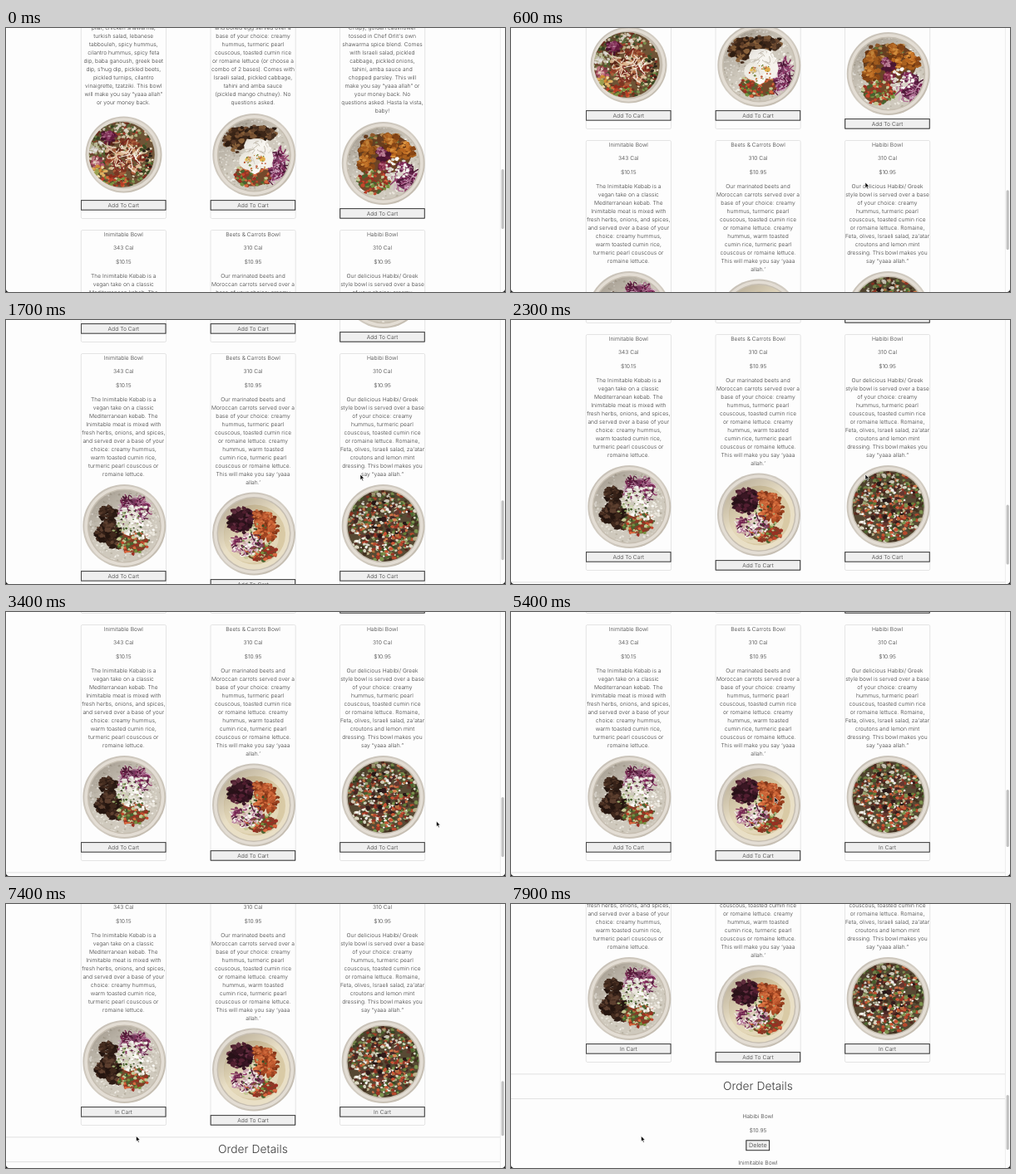
An HTML page that plays this animation: 600 by 318 pixels, repeating every 8000 ms.

```html
<!DOCTYPE html>
<html lang="en">
<head>
<meta charset="utf-8">
<title>Bowl menu</title>
<style>
html, body { margin: 0; width: 100%; height: 100%; overflow: hidden; background: #fdfdfd; }
svg { display: block; width: 600px; height: 318px; }
text {
  font: 300 6.7px Inter, "Open Sans", sans-serif;
  letter-spacing: .03px; fill: #3c3c3c; text-anchor: middle;
  text-rendering: geometricPrecision;
}
#heading { font-size: 13.8px; }
.small { font-size: 7.2px; }
.card { fill: none; stroke: #dfdfdf; stroke-width: .8; }
.rule { stroke: #dedede; stroke-width: .9; }
</style>
</head>
<body>
<svg id="stage" viewBox="0 0 600 318"></svg>
<script>
const LOOP = 8000, STEP = 100;
const COLS = [141.3, 297, 452.5];

let seed = 7;
function rnd() {
  seed = (seed + 0x6D2B79F5) | 0;
  let t = Math.imul(seed ^ (seed >>> 15), 1 | seed);
  t = (t + Math.imul(t ^ (t >>> 7), 61 | t)) ^ t;
  return ((t ^ (t >>> 14)) >>> 0) / 4294967296;
}
const spread = a => (rnd() * 2 - 1) * a;
const pick = list => list[Math.floor(rnd() * list.length)];
const num = v => v.toFixed(1);

// Food shapes, in a space where the bowl has radius 50
function spot(x, y, rx, ry) {
  const a = rnd() * Math.PI * 2, d = Math.sqrt(rnd());
  return [x + Math.cos(a) * d * rx, y + Math.sin(a) * d * ry];
}
function chunk(x, y, size, color) {
  const turn = rnd() * 6, pts = [];
  for (let i = 0; i < 6; i++) {
    const a = turn + i * Math.PI / 3, d = size * (.6 + rnd() * .5);
    pts.push(num(x + Math.cos(a) * d) + "," + num(y + Math.sin(a) * d * .8));
  }
  return `<polygon points="${pts.join(" ")}" fill="${color}"/>`;
}
function bits(n, x, y, rx, ry, size, colors) {
  const list = colors.split(" ");
  let out = "";
  while (n--) out += chunk(...spot(x, y, rx, ry), size * (.7 + rnd() * .6), pick(list));
  return out;
}
function shreds(n, x, y, rx, ry, len, width, colors) {
  const list = colors.split(" ");
  let out = "";
  while (n--) {
    const [px, py] = spot(x, y, rx, ry);
    out += `<path d="M${num(px)} ${num(py)}q${num(spread(len))} ${num(spread(len))} ${num(spread(len))} ${num(spread(len))}" fill="none" stroke="${pick(list)}" stroke-width="${width}" stroke-linecap="round"/>`;
  }
  return out;
}
const disc = (x, y, rx, ry, color) =>
  `<ellipse cx="${x}" cy="${y}" rx="${rx}" ry="${ry}" fill="${color}"/>`;
// A rough lump: dark all round, lit from the upper left
const ball = (x, y, r, dark, light) =>
  bits(30, x + 1, y + 1.5, r * .85, r * .85, r * .35, dark) +
  bits(26, x - r * .1, y - r * .15, r * .65, r * .6, r * .22, light);

const RICE = "#e9e5dc #d8d3c8 #c6c0b3 #f3f0e9 #b5ae9f";
const GREEN = "#4c6630 #7d9450 #354a24 #a5b27a";
const SALAD = "#c4472c #d8683f #74913f #c3c893 #48632f #9c2f22 #8a3a26";
const PURPLE = "#5e1c42 #8f3566 #b27396 #7a2353 #d3b0c4 #4a1734";
const WHITE = "#fbfaf6 #ece8df #dad5c9";
const HOT = "#c9772a #dc9440 #b8651f", BURNT = "#8a4716 #a9601f #6f3812";
const DARK = "#2c1b14 #3f281c #24150f", CRUST = "#4a3023 #5e4030 #38231a";

const rice = () => disc(0, 0, 45, 45, "#cfc9bd") + bits(420, 0, 0, 44, 44, 1.5, RICE);
const salad = (x, y, rx, ry) => disc(x, y, rx * .9, ry * .9, "#73492b") + bits(100, x, y, rx, ry, 2.6, SALAD);
const cabbage = (x, y, rx, ry) => disc(x, y, rx * .85, ry * .85, "#7a3a62") + shreds(110, x, y, rx, ry, 8, 1.3, PURPLE);

const FOODS = {
  chicken: () => disc(0, 0, 46, 46, "#6e5436") +
    bits(280, 0, 0, 45, 45, 2.6, GREEN + " #75311f #e6dcc6 #a8452e #573a24 #d9c9a2") +
    bits(50, 3, -30, 20, 10, 2.6, "#f1ebdd #a93a2a #ded0b3 #5c7340 #c9b48a") +
    ball(-18, -24, 10, "#6b1b43 #8a2c5c #4e1230", "#a24a78 #c98aaa #8c2f60") +
    bits(34, -33, -8, 10, 9, 2.8, WHITE + " #cfd1a9 #b9b98c") +
    ball(-33, 9, 9, "#9c4257 #b86678 #7d3543", "#e0b2b0 #c97d87 #eadcc6") +
    bits(34, -30, 22, 9, 8, 2.8, "#d08a35 #e0b160 #9aa050 #e8d9a8") +
    bits(44, -8, 34, 18, 8, 2.8, "#b93d26 #d8693c #7d9440 #8f2c1c") +
    bits(110, 4, 3, 25, 24, 3.8, "#7c3522 #a85d3b #c99468 #5c2618 #913f29 #dcb48c") +
    bits(50, 31, 10, 10, 22, 2.6, "#3c4a24 #812c20 #d8c9a6 #2b2018") +
    shreds(44, 3, 0, 22, 21, 12, 1.3, "#f8efe2 #ecd9c4 #7d2420 #e0c3a6"),
  egg: () => rice() +
    disc(-16, -20, 17, 14, "#3d2618") + disc(6, -27, 16, 8, "#3d2618") +
    bits(70, -18, -19, 19, 16, 3.8, "#452b1a #62402a #805635 #2f1d12 #94693f") +
    bits(40, 8, -27, 19, 9, 3.4, "#452f20 #6b4930 #2c1d13 #805a38") +
    cabbage(27, 13, 13, 20) + salad(-2, 25, 24, 14) +
    bits(44, 3, 0, 18, 19, 5.5, WHITE) +
    disc(3, -10, 15, 10, "#f8f6f1") + disc(-6, 7, 12, 11, "#efece4") + disc(14, 3, 9, 13, "#f5f2ec") +
    disc(-7, 6, 4, 3, "#e6bb56") + disc(10, 5, 3.5, 3, "#e0ac48") +
    shreds(14, 4, 0, 17, 17, 9, 1, "#d6d0c4 #c6bfb2") +
    bits(30, 4, 10, 17, 11, 1.3, "#c98434 #73853f #b95230"),
  cauliflower: () => rice() +
    disc(2, -12, 32, 24, "#6b4426") +
    bits(50, 2, -26, 28, 11, 2.8, "#a5642f #c99a5c #71401f #6c7c3c") +
    [[-20, -20], [8, -28], [-22, -1], [28, -17], [10, -10]]
      .map(([x, y]) => ball(x, y, 11, BURNT, HOT)).join("") +
    ball(-2, -12, 9, "#5c1a38 #78284c #4a1530", "#9c4a70 #bd8098 #7d2c52") +
    ball(1, 4, 8, "#7a2440 #963a52 #5c1a30", "#b8607a #8f3450") +
    salad(-12, 23, 20, 14) + cabbage(27, 17, 13, 17) +
    bits(46, 17, 6, 14, 12, 2.4, WHITE),
  kebab: () => rice() +
    cabbage(12, -20, 21, 15) +
    bits(40, 20, -12, 16, 12, 2.4, RICE) +
    [[-20, -16], [-25, 8], [-11, 16], [-16, 2]]
      .map(([x, y]) => ball(x, y, 12, DARK, CRUST)).join("") +
    salad(11, 19, 19, 15) +
    bits(70, 4, -7, 13, 18, 2.8, WHITE + " #cdd3b0") +
    bits(44, 22, 4, 15, 13, 2.2, WHITE) +
    bits(36, 6, 2, 20, 24, 1.5, GREEN),
  beets: () => disc(0, 0, 45, 45, "#e9dfc6") + disc(1, 1, 37, 36, "#d9caa5") + disc(-3, 3, 33, 32, "#e3d7b8") +
    disc(-15, -16, 14, 13, "#321220") +
    bits(60, -15, -16, 16, 15, 4.2, "#3c1626 #551f33 #281019 #693046") +
    [[5, -23], [17, -20], [21, -9], [8, -11], [18, 1], [6, 0]]
      .map(([x, y]) => ball(x, y, 8.5, "#9c4320 #b5522a #833518", "#d0683a #c25a30 #dc7c48")).join("") +
    disc(-8, 14, 20, 11, "#c9a9a4") + salad(8, 22, 21, 11) +
    bits(90, -9, 13, 20, 12, 2.6, "#f8f4ee #e8dcd6 #c99fae #7d3a58 #ddd0bb") +
    shreds(34, -10, 14, 17, 11, 8, 1.2, PURPLE + " #f4efe9") +
    bits(26, 3, 6, 18, 18, 1.8, GREEN + " #f4efe9"),
  habibi: () => disc(0, 0, 46, 46, "#574a34") +
    bits(380, 0, 0, 43, 43, 2.9, GREEN + " #b5492e #9a3524 #dcd8c4 #53291f #cc7048 #b9ae88 #41301f") +
    bits(46, 0, -4, 34, 30, 3.8, "#321c1b #4a2825 #251716 #63382f") +
    bits(110, 0, 0, 39, 39, 2, WHITE + " #d3d6bf") +
    bits(46, 0, 4, 36, 32, 2.4, "#cc5434 #657f3a #b0703f #d8824c")
};

function bowl([x, y, r, food]) {
  const inner = food === "chicken" ? -2.5 : 0;
  return `<g transform="translate(${x} ${y}) scale(${r / 50})">` +
    `<circle r="50" fill="url(#rim)"/><circle r="48" fill="#e3ddd4"/><circle r="44.5" fill="#c6beb1"/>` +
    `<g clip-path="url(#inside)" transform="translate(${inner} 0)"><g filter="url(#soft)">${FOODS[food]()}</g>` +
    `<circle r="46" fill="url(#shade)"/></g></g>`;
}

function label(x, y, str, attrs = "") {
  return `<text x="${x}" y="${y + 2.4}" ${attrs}>${str}</text>`;
}
const lines = (x, y, str) =>
  str.split("|").map((s, i) => label(x, y + i * 10, s)).join("");

function button(x, y, w, h, str, attrs) {
  const l = x - w / 2, t = y - h / 2;
  return `<rect x="${l}" y="${t}" width="${w}" height="${h}" fill="#1a1a1a"/>` +
    `<path d="M${l} ${t + h}V${t}H${l + w}l-.9 .9H${l + .9}V${t + h - .9}z" fill="#4c4c4c"/>` +
    `<rect x="${l + .9}" y="${t + .9}" width="${w - 1.8}" height="${h - 1.8}" fill="#efefef"/>` +
    label(x, y, str, attrs);
}
const card = (x, top, bottom) =>
  `<rect class="card" x="${x - 51}" y="${top}" width="102.2" height="${bottom - top}" rx="1.6"/>`;

// Page positions are those seen with the scroll offset at zero
const UPPER = [
  { text: "pilaf, chicken shawarma,|turkish salad, lebanese|tabbouleh, spicy hummus,|cilantro hummus, spicy feta|dip, baba ganoush, greek beet|dip, s’hug dip, pickled beets,|pickled turnips, cilantro|vinaigrette, tzatziki. This bowl|will make you say “yaaa allah”|or your money back.",
    bowl: [141.5, -75.5, 46, "chicken"], button: -14.6 },
  { text: "and boiled egg served over a|base of your choice: creamy|hummus, turmeric pearl|couscous, toasted cumin rice|or romaine lettuce (or choose a|combo of 2 bases). Comes with|Israeli salad, pickled cabbage,|tahini and amba sauce|(pickled mango chutney). No|questions asked.",
    bowl: [298.3, -75, 50, "egg"], button: -14.6 },
  { text: "Crispy, golden cauliflower|tossed in Chef Orlit's own|shawarma spice blend. Comes|with Israeli salad, pickled|cabbage, pickled onions,|tahini, amba sauce and|chopped parsley. This will|make you say “yaaa allah” or|your money back. No|questions asked. Hasta la vista,|baby!",
    bowl: [453.7, -65, 50, "cauliflower"], button: -4.6 }
];
const LOWER = [
  { name: "Inimitable Bowl", cal: 343, price: "$10.15", id: "kebabButton",
    text: "The Inimitable Kebab is a|vegan take on a classic|Mediterranean kebab. The|Inimitable meat is mixed with|fresh herbs, onions, and spices,|and served over a base of your|choice: creamy hummus,|warm toasted cumin rice,|turmeric pearl couscous or|romaine lettuce.",
    bowl: [142.3, 223, 50, "kebab"], button: 283.4 },
  { name: "Beets &amp; Carrots Bowl", cal: 310, price: "$10.95", id: "beetsButton",
    text: "Our marinated beets and|Moroccan carrots served over a|base of your choice: creamy|hummus, turmeric pearl|couscous, toasted cumin rice|or romaine lettuce. creamy|hummus, warm toasted|cumin rice, turmeric pearl|couscous or romaine lettuce.|This will make you say ‘yaaa|allah.’",
    bowl: [298, 232.5, 50, "beets"], button: 293.4 },
  { name: "Habibi Bowl", cal: 310, price: "$10.95", id: "habibiButton",
    text: "Our delicious Habibi/ Greek|style bowl is served over a base|of your choice: creamy|hummus, turmeric pearl|couscous, toasted cumin rice|or romaine lettuce. Romaine,|Feta, olives, Israeli salad, za'atar|croutons and lemon mint|dressing. This bowl makes you|say “yaaa allah.”",
    bowl: [453.6, 223, 50, "habibi"], button: 283.4 }
];

const upper = UPPER.map((d, i) => card(COLS[i], -420, 1.5) + lines(COLS[i], -228, d.text) +
  bowl(d.bowl) + button(COLS[i], d.button, 102.4, 12.4, "Add To Cart")).join("");
const lower = LOWER.map((d, i) => card(COLS[i], 15.5, 299.5) +
  label(COLS[i], 20.3, d.name) + label(COLS[i], 37, d.cal + " Cal") +
  label(COLS[i], 53.6, d.price) + lines(COLS[i], 70.2, d.text) + bowl(d.bowl) +
  button(COLS[i], d.button, 102.4, 12.4, "Add To Cart", `id="${d.id}"`)).join("");
const order = (id, y, name, price) => `<g id="${id}">` + label(297, y, name) +
  label(297, y + 16.5, price) + button(296.8, y + 34.8, 28.6, 12.8, "Delete", 'class="small"') + "</g>";

const $ = id => document.getElementById(id);
$("stage").innerHTML = `
<defs>
  <linearGradient id="rim" x1="0" y1="0" x2="1" y2="1">
    <stop offset="0" stop-color="#c4bdb3"/><stop offset=".5" stop-color="#d3cdc3"/><stop offset="1" stop-color="#beb6a9"/>
  </linearGradient>
  <linearGradient id="shade" x1=".1" y1="0" x2=".7" y2=".8">
    <stop offset="0" stop-color="#2a1c10" stop-opacity=".3"/><stop offset=".6" stop-color="#2a1c10" stop-opacity="0"/>
  </linearGradient>
  <filter id="soft"><feGaussianBlur stdDeviation=".5"/></filter>
  <clipPath id="inside"><circle r="43"/></clipPath>
</defs>
<rect width="600" height="318" fill="#fdfdfd"/>
<g id="page">${upper}${lower}
  <path class="rule" d="M0 313.9H594M0 343.6H594"/>
  <text id="heading" x="297" y="333.2">Order Details</text>
  ${order("orderOne", 365, "Habibi Bowl", "$10.95")}
  ${order("orderTwo", 421, "Inimitable Bowl", "$10.15")}
</g>
<path d="M594.4 0V318" stroke="#e9e9e9" stroke-width=".7"/>
<rect id="thumb" x="595.6" width="3.2" rx="1.6" fill="#c1c1c1"/>
<path d="M0 318V315Q.3 317.7 3 318zM600 318V315Q599.7 317.7 597 318z" fill="#111"/>
<path id="arrow" d="M0 0V6.6L1.5 5.2L2.6 7.7L3.7 7.2L2.6 4.8H4.7z" fill="#000" stroke="#fff" stroke-width=".6"/>
<path id="hand" d="M1.5 4V.7Q2.1-.2 2.7.7V3L5.6 3.6Q6.4 3.9 6.2 5L5.5 7.5H2.4L.1 4.6Q.2 3.6 1.5 4.5z" fill="#fff" stroke="#000" stroke-width=".7"/>`;

// Tables of [time, values...]
const SCROLL = [[0, 228], [200, 188], [400, 148], [600, 120], [900, 92], [1200, 60], [1500, 34],
  [1700, 25], [2000, 10], [2300, 2], [2500, 0], [7100, 0], [7200, -3], [7500, -48], [7700, -84], [7900, -109]];
const POINTER = [[0, 426, 186], [2600, 426, 186], [3200, 517.5, 252], [3400, 517.5, 252],
  [3600, 482, 284], [3900, 453, 280], [4700, 453, 280], [5400, 317, 223], [6200, 154, 279.5], [7900, 154, 279.5]];
const POINTER_SHOWN = 300, FIRST_CLICK = 4200, SECOND_CLICK = 6500;
const THUMBS = [[223, 72, .232], [214, 69, .225], [206, 66, .22]];

function at(table, t) {
  const i = table.findIndex(k => k[0] > t);
  if (i < 0) return table[table.length - 1].slice(1);
  const a = table[i - 1], b = table[i], p = (t - a[0]) / (b[0] - a[0]);
  return a.slice(1).map((v, j) => v + (b[j + 1] - v) * p);
}
const show = (id, on) => $(id).setAttribute("visibility", on ? "visible" : "hidden");

let last = -1;
function draw(t) {
  const [scroll] = at(SCROLL, t);
  const [x, y] = at(POINTER, t);
  const first = t >= FIRST_CLICK, second = t >= SECOND_CLICK;
  $("page").setAttribute("transform", `translate(0 ${Math.round(scroll)})`);
  $("habibiButton").textContent = first ? "In Cart" : "Add To Cart";
  $("kebabButton").textContent = second ? "In Cart" : "Add To Cart";
  show("orderOne", first);
  show("orderTwo", second);

  const [top, height, rate] = THUMBS[first + second];
  $("thumb").setAttribute("y", top - scroll * rate);
  $("thumb").setAttribute("height", height);

  const hand = (t >= 3800 && t < 4800) || (t >= 6200 && t < 7300);
  show("hand", hand);
  show("arrow", !hand && t >= POINTER_SHOWN);
  const shift = t >= 7300 ? 2.5 : 0;
  $(hand ? "hand" : "arrow").setAttribute("transform", `translate(${x + shift} ${y})`);
}

const start = performance.now();
function tick() {
  const t = Math.floor(((performance.now() - start) % LOOP) / STEP) * STEP;
  if (t !== last) draw(last = t);
  requestAnimationFrame(tick);
}
tick();
</script>
</body>
</html>
```
